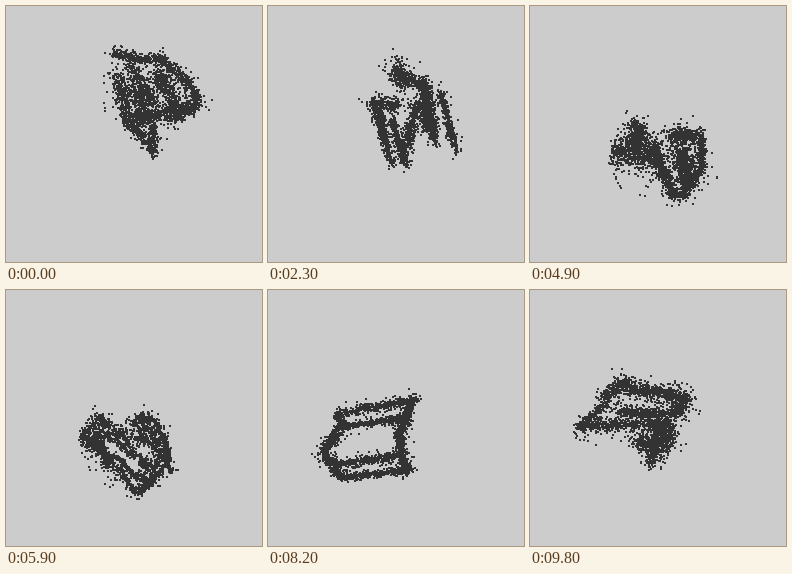
These frames come from a looping animation (256x256 px, 10 s). A matplotlib script:

```python
import numpy as np
import matplotlib.pyplot as plt
from matplotlib.animation import FuncAnimation

SIZE, DPI = 256, 100
COUNT = 3000
COLUMNS = 60
STEPS = 100

# Each pose is a set of fuzzy strokes: x1, y1, x2, y2, spread x, spread y.
FAN = [
    (106, 47, 130, 52, 3, 3), (130, 53, 160, 53, 3, 2.5),
    (152, 51, 182, 76, 3, 3), (181, 74, 193, 98, 3, 3),
    (188, 98, 165, 115, 5, 4), (123, 58, 148, 98, 3, 4),
    (152, 66, 172, 105, 6, 5), (111, 68, 123, 118, 4, 4),
    (131, 80, 138, 118, 7, 4), (165, 106, 125, 114, 4, 4),
    (126, 118, 149, 147, 3, 3), (146, 120, 148, 144, 3, 3),
]
BLADES = [
    (104, 96, 125, 160, 2, 3), (111, 105, 119, 138, 2, 4),
    (123, 112, 138, 158, 2, 4), (128, 58, 134, 78, 4, 5),
    (133, 70, 160, 82, 4, 4), (157, 82, 168, 136, 2.5, 4),
    (172, 85, 188, 144, 2, 3), (150, 98, 134, 150, 3, 5),
    (106, 97, 130, 100, 3, 4), (157, 90, 160, 122, 4, 5),
]
LUMPS = [
    (93, 122, 107, 126, 1, 8), (93, 141, 135, 147, 1, 7),
    (119, 90, 126, 106, 4, 4), (114, 110, 131, 112, 2, 3),
    (122, 150, 122, 166, 4, 4), (139, 129, 180, 127, 0.8, 9),
    (148, 143, 179, 144, 2, 8), (163, 158, 170, 174, 3, 4),
    (133, 128, 137, 142, 1.5, 5),
]
FOLD = [
    (81, 147, 128, 151, 1.5, 8), (97, 136, 115, 130, 4, 6),
    (105, 118, 110, 126, 4, 4), (125, 138, 133, 168, 3, 5),
    (141, 129, 165, 130, 4, 4), (170, 132, 172, 160, 2, 5),
    (171, 162, 150, 192, 2.5, 3), (134, 164, 144, 192, 3, 3),
    (150, 140, 158, 178, 6, 6),
]
LADDER = [
    (70, 142, 92, 194, 2.3, 2.3), (94, 199, 116, 199, 2, 2),
    (116, 198, 152, 181, 2, 2.2), (135, 125, 152, 180, 2.5, 2.5),
    (71, 139, 133, 124, 2.3, 2.8), (76, 154, 132, 142, 2, 2.3),
    (87, 184, 145, 171, 2, 2.3),
]
BOX = [
    (69, 124, 149, 109, 2, 2.2), (72, 137, 140, 127, 2, 2),
    (67, 174, 134, 166, 2, 2.2), (70, 188, 145, 180, 2, 2),
    (70, 124, 74, 138, 2.5, 2), (71, 141, 56, 160, 3, 3),
    (55, 162, 73, 186, 3, 2.5), (143, 113, 131, 148, 3, 3),
    (130, 145, 137, 180, 3, 3),
]
JAW = [
    (73, 108, 98, 91, 4, 4.5), (97, 98, 158, 108, 5, 4.5),
    (153, 108, 146, 126, 5, 4), (48, 138, 76, 113, 2, 2),
    (46, 137, 132, 133, 3, 4), (131, 132, 120, 174, 4, 4),
    (138, 130, 133, 160, 6, 5), (90, 122, 135, 124, 6, 3),
    (108, 150, 122, 158, 6, 4),
]
POSES = [FAN, BLADES, LUMPS, FOLD, LADDER, BOX, JAW]
TIMES = np.array([0, 21, 35, 45, 63, 75, 90], float)


def cloud(strokes, rng):
    s = np.array(strokes, float)
    a, b, spread = s[:, :2], s[:, 2:4], s[:, 4:]
    weight = (np.hypot(*(b - a).T) + 8) * spread.sum(1)
    pick = rng.choice(len(s), COUNT, p=weight / weight.sum())
    u = rng.random((COUNT, 1))
    noise = np.clip(0.8 * rng.standard_t(4, (COUNT, 2)), -5, 5)
    return a[pick] + u * (b - a)[pick] + noise * spread[pick]


def ordered(points):
    """Sort by column, then by height, so poses pair up smoothly."""
    points = points[np.argsort(points[:, 0])]
    parts = np.array_split(points, COLUMNS)
    return np.concatenate([p[np.argsort(p[:, 1])] for p in parts])


rng = np.random.default_rng(7)
keys = np.array([ordered(cloud(p, rng)) for p in POSES])
slopes = np.gradient(keys, TIMES, axis=0)


def positions(t):
    i = min(np.searchsorted(TIMES, t, side="right") - 1, len(TIMES) - 2)
    h = TIMES[i + 1] - TIMES[i]
    u = (t - TIMES[i]) / h
    return ((1 + 2 * u) * (1 - u) ** 2 * keys[i]
            + u * (1 - u) ** 2 * h * slopes[i]
            + u * u * (3 - 2 * u) * keys[i + 1]
            + u * u * (u - 1) * h * slopes[i + 1])


fig = plt.figure(figsize=(SIZE / DPI, SIZE / DPI), dpi=DPI, facecolor="#cccccc")
ax = fig.add_axes([0, 0, 1, 1])
ax.set(xlim=(0, SIZE), ylim=(SIZE, 0))
ax.axis("off")
dot = 2 * 72 / DPI
dots = ax.scatter([], [], s=dot ** 2, marker="s", c="#333333",
                  linewidths=0, antialiased=False)


def update(k):
    # the cloud rests for one tick out of every eleven
    dots.set_offsets(np.round(positions(k - k // 11)))
    return dots,


anim = FuncAnimation(fig, update, frames=STEPS, interval=100,
                     repeat=True, repeat_delay=0)
plt.show()
```
